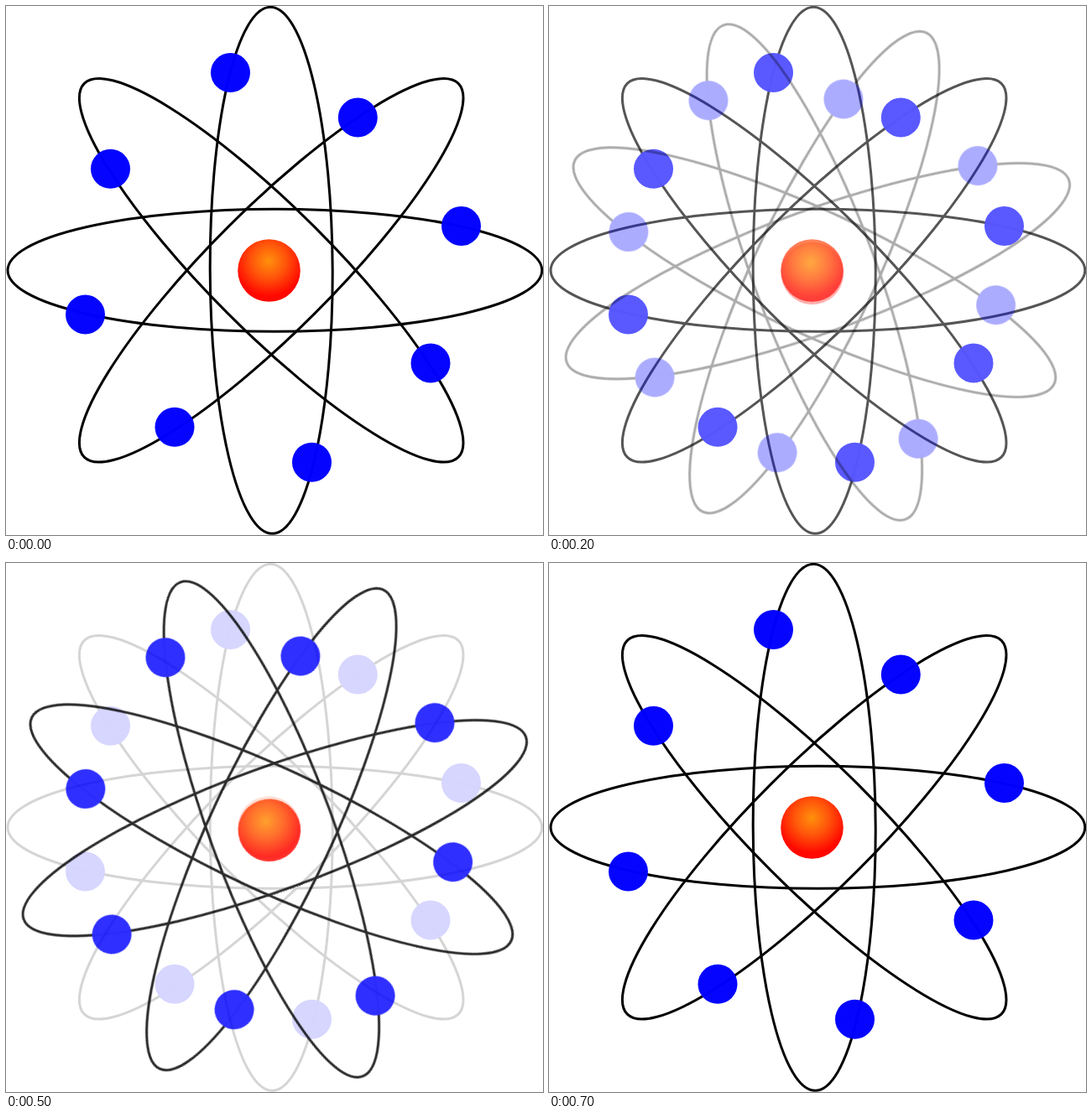
Recreate the animation shown at these times as an HTML page. Size 640x631 px, loop 0.8 s.

```html
<!DOCTYPE html>
<html lang="en">
<head>
<meta charset="utf-8">
<title>Atom</title>
<style>
  html, body { margin: 0; width: 100%; height: 100%; overflow: hidden; background: #fff; }
  svg { display: block; width: 100%; height: 100%; }
  .orbits { fill: none; stroke: #000; stroke-width: 3; }
  .electrons { fill: #00f; fill-opacity: .98; }
  .upright { animation: fade-out 800ms step-end infinite; }
  .tilted { animation: fade-in 800ms step-end infinite; }

  @keyframes fade-out {
    0% { opacity: 1; }
    12.5% { opacity: .8333; }
    25% { opacity: .6667; }
    37.5% { opacity: .5; }
    50% { opacity: .3333; }
    62.5% { opacity: .1667; }
    75% { opacity: 0; }
    87.5%, 100% { opacity: 1; }
  }
  @keyframes fade-in {
    0% { opacity: 0; }
    12.5% { opacity: .1667; }
    25% { opacity: .3333; }
    37.5% { opacity: .5; }
    50% { opacity: .6667; }
    62.5% { opacity: .8333; }
    75% { opacity: 1; }
    87.5%, 100% { opacity: 0; }
  }
</style>
</head>
<body>
<svg viewBox="0 0 640 631" preserveAspectRatio="none">
  <defs>
    <radialGradient id="glow" gradientUnits="userSpaceOnUse" cx="313" cy="304" r="42">
      <stop offset="0" stop-color="#ff910c"/>
      <stop offset=".5" stop-color="#ff540a"/>
      <stop offset="1" stop-color="#ff0800"/>
    </radialGradient>
    <g id="atom">
      <g class="orbits">
        <ellipse cx="320.4" cy="315.3" rx="318.4" ry="73"/>
        <ellipse cx="316.2" cy="315.3" rx="314" ry="73" transform="rotate(89.8 316.2 315.3)"/>
        <ellipse cx="316.2" cy="315.3" rx="315.2" ry="73" transform="rotate(45 316.2 315.3)"/>
        <ellipse cx="316.2" cy="315.3" rx="315.2" ry="73" transform="rotate(-45 316.2 315.3)"/>
      </g>
      <g class="electrons">
        <circle cx="267.5" cy="79.5" r="23.5"/>
        <circle cx="419.3" cy="133" r="23.5"/>
        <circle cx="542.5" cy="262.5" r="23.5"/>
        <circle cx="506" cy="426" r="23.5"/>
        <circle cx="364.5" cy="544.2" r="23.5"/>
        <circle cx="201" cy="502.3" r="23.5"/>
        <circle cx="94.5" cy="368" r="23.5"/>
        <circle cx="124.5" cy="194.3" r="23.5"/>
      </g>
      <circle cx="313.5" cy="315.5" r="37.3" fill="url(#glow)"/>
    </g>
  </defs>
  <g class="upright"><use href="#atom"/></g>
  <g class="tilted"><use href="#atom" transform="translate(316.1 317.4) rotate(-20) translate(-316 -315)"/></g>
</svg>
</body>
</html>
```
